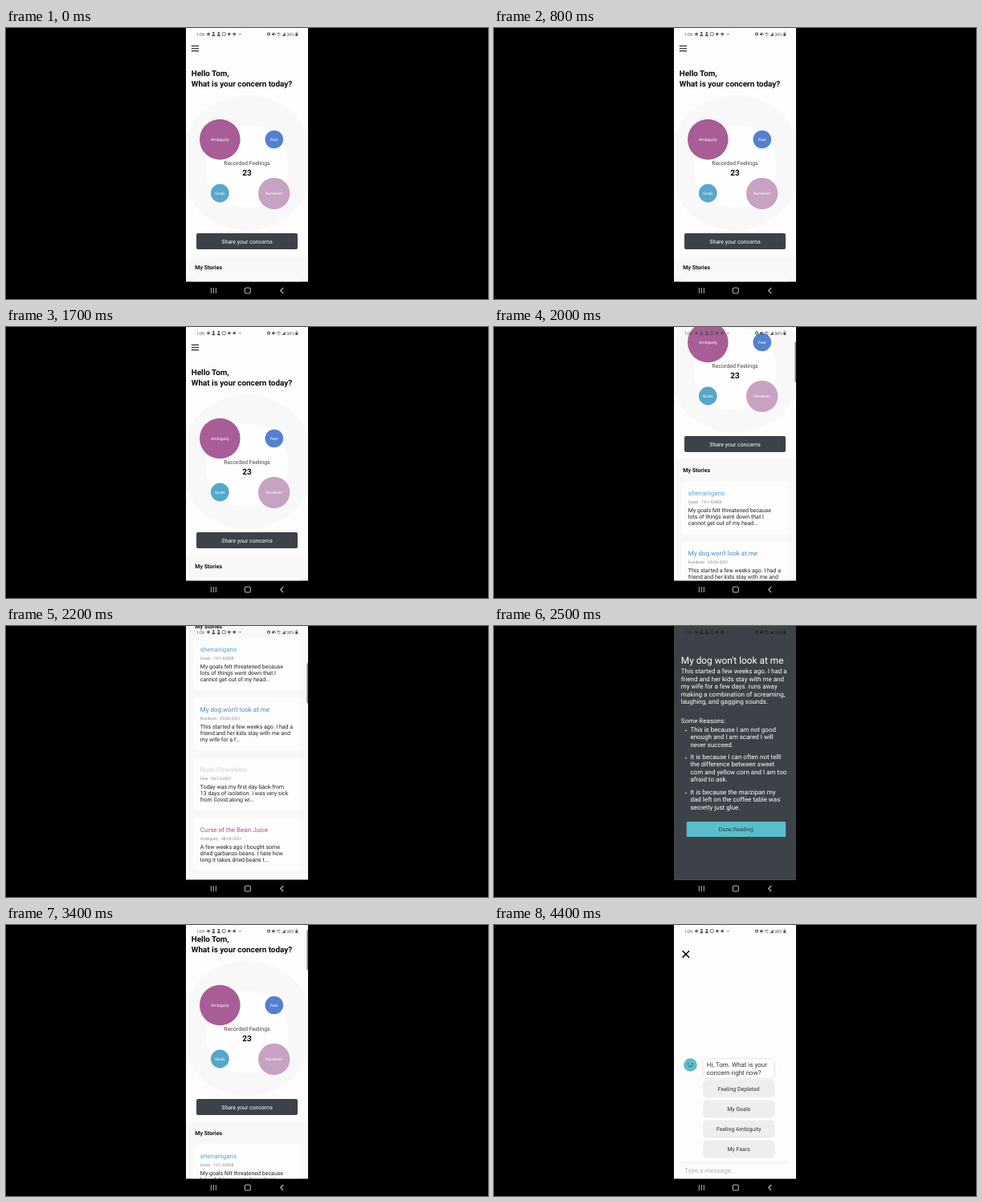
These frames come from a looping animation (600 px wide and 338 px high, 5 s). An HTML page:

```html
<!DOCTYPE html>
<html lang="en">
<head>
<meta charset="utf-8">
<title>Concerns app</title>
<style>
  html, body { margin: 0; width: 100%; height: 100%; overflow: hidden; background: #000; }
  svg { display: block; width: 600px; height: 338px; }
  text { font-family: Roboto, Arial, sans-serif; text-rendering: geometricPrecision; white-space: pre; }
</style>
</head>
<body>
<svg id="stage" viewBox="0 0 600 338"></svg>
<script>
const LOOP = 5000;
const STEP = 100;

// time, scroll, scrollbar, story opacity, chat opacity, reply, options
const steps = [
  [0,      0,  0,  0,  0,  0, 0],
  [1900,   8, .6,  0,  0,  0, 0],
  [2000, 120,  1,  0,  0,  0, 0],
  [2100, 262,  1,  0,  0,  0, 0],
  [2200, 298,  1,  0,  0,  0, 0],
  [2400, 298, .6, .6,  0,  0, 0],
  [2500, 298,  0,  1,  0,  0, 0],
  [3000, 298,  0, .5,  0,  0, 0],
  [3100, 298,  0,  0,  0,  0, 0],
  [3200, 240,  1,  0,  0,  0, 0],
  [3300,  95,  1,  0,  0,  0, 0],
  [3400,  39,  1,  0,  0,  0, 0],
  [3600,  39, .5,  0,  0,  0, 0],
  [3700,  39,  0,  0,  0,  0, 0],
  [3900,  39,  0,  0, .5,  0, 0],
  [4000,  39,  0,  0,  1,  0, 0],
  [4200,  39,  0,  0,  1,  1, 0],
  [4300,  39,  0,  0,  1,  1, .5],
  [4400,  39,  0,  0,  1,  1, 1]
];

const text = (x, y, size, fill, str, more = '') =>
  `<text x="${x}" y="${y}" font-size="${size}" fill="${fill}" ${more}>${str}</text>`;
const mid = (x, y, size, fill, str, more = '') =>
  text(x, y, size, fill, str, 'text-anchor="middle" ' + more);
const lines = (x, y, size, pitch, fill, list) =>
  list.map((s, i) => text(x, y + i * pitch, size, fill, s)).join('');
const rect = (x, y, w, h, fill, r = 0, more = '') =>
  `<rect x="${x}" y="${y}" width="${w}" height="${h}" rx="${r}" fill="${fill}" ${more}/>`;
const circle = (x, y, r, fill, more = '') =>
  `<circle cx="${x}" cy="${y}" r="${r}" fill="${fill}" ${more}/>`;
const stroke = (d, color, w, more = '') =>
  `<path d="${d}" fill="none" stroke="${color}" stroke-width="${w}" ${more}/>`;
const group = (id, body) => `<g id="${id}">${body}</g>`;

const bold = 'font-weight="700"';
const paper = '#fdfdfd', slate = '#3d4248', teal = '#58bfca';

const bubble = (x, y, r, fill, label) =>
  circle(x, y, r, fill) + mid(x, y + 1.9, 5, '#fff', label);

const stories = [
  ['#58a6d2', 'shenanigans', 'Goals · 19-1-53858',
    ['My goals felt threatened because', 'lots of things went down that I', 'cannot get out of my head...']],
  ['#4486c6', "My dog won't look at me", 'Rundown · 05-06-2021',
    ['This started a few weeks ago. I had a', 'friend and her kids stay with me and', 'my wife for a f...']],
  ['#e0c3dd', 'Rude Coworkers', 'Fear · 06-12-2021',
    ['Today was my first day back from', '13 days of isolation. I was very sick', 'from Covid along wi...']],
  ['#a9509a', 'Curse of the Bean Juice', 'Ambiguity · 08-24-2021',
    ['A few weeks ago I bought some', 'dried garbanzo beans. I hate how', 'long it takes dried beans t...']]
];

const card = ([color, title, meta, body], i) => {
  const y = 312.5 + 75 * i;
  return rect(233, y, 134, 66, paper, 5) +
    text(241.8, y + 17.3, 8, color, title) +
    text(241.8, y + 27.2, 5, '#8a8a8a', meta) +
    lines(241.8, y + 38.5, 7, 8.1, '#222', body);
};

const home = group('page',
  stroke('M230.8 22.3h9.2M230.8 25.5h9.2M230.8 28.6h9.2', '#333', 1.2) +
  text(230.8, 60, 9.9, '#0a0a0a', 'Hello Tom,', bold) +
  text(230.8, 73.4, 9.9, '#0a0a0a', 'What is your concern today?', bold) +
  circle(300, 168, 84, '#f8f8f8') +
  rect(249, 121.5, 102, 102, '#fefefe', 46) +
  bubble(266.3, 139, 25.3, '#a85d97', 'Ambiguity') +
  bubble(333.8, 139, 11.3, '#5480d0', 'Fear') +
  bubble(266.3, 206, 11.4, '#55a7cb', 'Goals') +
  bubble(333.7, 206.4, 19.7, '#c8a2c2', 'Rundown') +
  mid(300, 171.3, 7, '#444', 'Recorded Feelings') +
  mid(300, 184, 10, '#0a0a0a', '23', bold) +
  rect(237, 256, 126, 20, slate, 2) +
  mid(300, 268.6, 7, '#fff', 'Share your concerns') +
  rect(224, 285, 152, 700, '#f8f8f9') +
  text(235.3, 301.4, 7, '#111', 'My Stories', bold) +
  stories.map(card).join(''));

const reason = (y, list) =>
  circle(239, y - 1.4, .8, '#fff') + lines(244.4, y, 8, 9.45, '#fff', list);

const story = group('story',
  rect(224, 0, 152, 317, slate) +
  text(232.8, 47, 11.85, '#fff', "My dog won't look at me") +
  lines(232.8, 59.2, 8, 9.45, '#fff', [
    'This started a few weeks ago. I had a', 'friend and her kids stay with me and',
    'my wife for a few days. runs away', 'making a combination of screaming,',
    'laughing, and gagging sounds.']) +
  text(232.8, 121, 8, '#fff', 'Some Reasons:') +
  reason(131.8, ['This is because I am not good', 'enough and I am scared I will', 'never succeed.']) +
  reason(166, ['It is because I can often not telll', 'the difference between sweet', 'corn and yellow corn and I am too', 'afraid to ask.'].slice(0, 4)) +
  reason(209.7, ['It is because the marzipan my', 'dad left on the coffee table was', 'secretly just glue.']) +
  rect(239.7, 244, 123.5, 19, teal, 1.5) +
  mid(301.4, 256.2, 7, '#2c3742', 'Done Reading'));

const option = (label, i) =>
  rect(260, 193.3 + 25.1 * i, 89.5, 22, '#eee', 5) +
  mid(304.7, 206.9 + 25.1 * i, 7, '#333', label);

const chat = group('chat',
  rect(224, 0, 152, 317, paper) +
  stroke('M234.6 32.2l8.4 8.4M243 32.2l-8.4 8.4', '#000', 1.5) +
  stroke('M233 296.3h134', '#e3e3e3', .8) +
  text(237, 309, 8, '#b0b0b0', 'Type a message...') +
  group('reply',
    circle(244.4, 174.5, 8.3, '#5bbfc8') +
    circle(241.6, 173, .8, '#25434c') + circle(247.2, 173, .8, '#25434c') +
    stroke('M241.8 175.6q2.6 2.6 5.2 0', '#25434c', .8, 'stroke-linecap="round"') +
    rect(260, 166.7, 89.5, 25, '#fff', 5, 'stroke="#dcdcdc" stroke-width=".8"') +
    lines(264.8, 176.9, 8, 9.7, '#333', ['Hi, Tom. What is your', 'concern right now?'])) +
  group('options', ['Feeling Depleted', 'My Goals', 'Feeling Ambiguity', 'My Fears'].map(option).join('')));

const person = x =>
  circle(x, 6, 1.2, 'currentColor') +
  `<path d="M${x - 2} 10.2q0-2.6 2-2.6t2 2.6z" fill="currentColor"/>`;
const ring = x => circle(x, 7.6, 1.9, 'currentColor', 'opacity=".85"');

const status = group('status',
  text(236.8, 9.6, 5.3, 'currentColor', '1:09') +
  ring(252) + person(258.3) + person(264.8) +
  rect(269.2, 5.6, 4, 4, 'none', 1, 'stroke="currentColor" stroke-width=".8"') +
  ring(277.8) + ring(284.2) + circle(291.3, 7.6, .8, 'currentColor') +
  circle(327, 7.7, 1.6, 'none', 'stroke="currentColor" stroke-width="1.1"') +
  '<path d="M331 6.7h1.2l1.7-1.4v4.8l-1.7-1.4h-1.2z" fill="currentColor"/>' +
  stroke('M334.6 6.2l1.2 2.8', 'currentColor', .7) +
  text(337.2, 8.2, 3.4, 'currentColor', '4G', bold) +
  stroke('M338.4 9.7h2.8', 'currentColor', .6) +
  '<path d="M343.6 10l4-4.6v4.6z" fill="currentColor"/>' +
  text(349, 9.6, 5.3, 'currentColor', '38%') +
  rect(360.3, 6.9, 3, 3, 'currentColor', .4) +
  stroke('M360.9 7v-1a.9 .9 0 0 1 1.8 0v1', 'currentColor', .6));

const nav = rect(224, 316.6, 152, 22, '#000') +
  stroke('M255.3 324v7M258.3 324v7M261.3 324v7', '#b8b8b8', 1) +
  rect(297.3, 324, 7, 7, 'none', 1.8, 'stroke="#b8b8b8" stroke-width="1.1"') +
  stroke('M345.2 324l-3.5 3.5l3.5 3.5', '#b8b8b8', 1.1);

const $ = id => document.getElementById(id);
$('stage').innerHTML =
  '<clipPath id="screen"><rect x="224" y="0" width="152" height="316.6"/></clipPath>' +
  rect(0, 0, 600, 338, '#000') +
  `<g clip-path="url(#screen)">${rect(224, 0, 152, 317, paper)}${home}` +
  `<rect id="bar" x="374.3" width="1.7" height="50" fill="#8c8c8c"/>${story}${chat}${status}</g>${nav}`;

const fade = (id, value) => $(id).setAttribute('opacity', value);

function draw(ms) {
  const t = Math.floor(ms % LOOP / STEP) * STEP;
  const [, scroll, bar, detail, talk, reply, options] = steps.filter(s => s[0] <= t).pop();
  $('page').setAttribute('transform', `translate(0 ${-scroll})`);
  $('bar').setAttribute('y', scroll * .156);
  fade('bar', bar);
  fade('story', detail);
  fade('chat', talk);
  fade('reply', reply);
  fade('options', options);
  $('status').style.color = detail > .5 ? '#1f2226' : '#555';
}

const start = performance.now();
function tick() {
  draw(performance.now() - start);
  requestAnimationFrame(tick);
}
tick();
</script>
</body>
</html>
```
